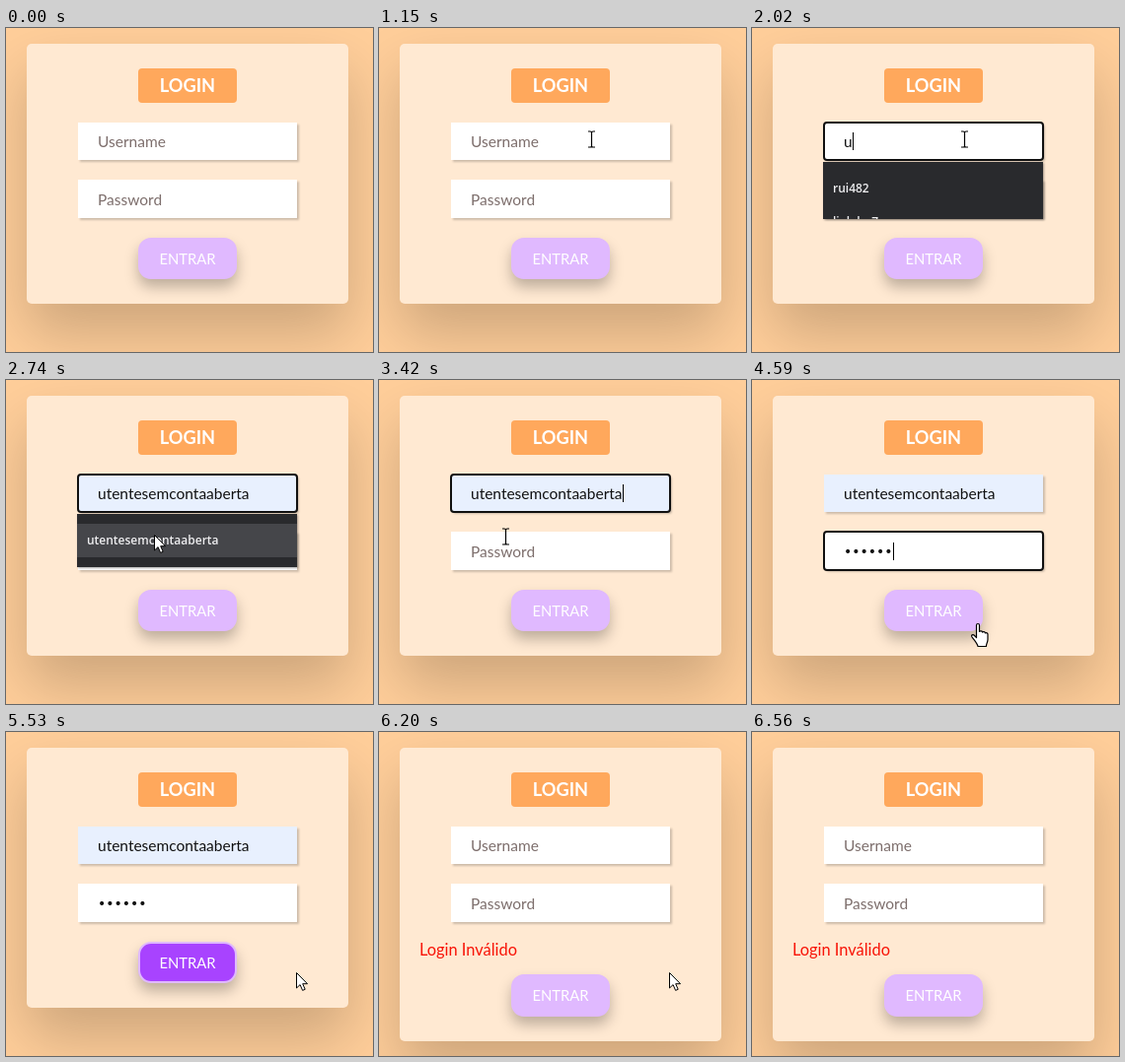
Write an HTML page that moves like this. It is 372 by 329 pixels and loops after 6.99 s.

```html
<!DOCTYPE html>
<html lang="pt">
<head>
<meta charset="utf-8">
<title>Login</title>
<style>
  html, body { margin: 0; width: 100%; height: 100%; overflow: hidden; }
  body { background: #ffce9a; }
  #stage {
    position: relative; width: 372px; height: 329px; overflow: hidden;
    font: 15.5px Lato, sans-serif; cursor: none;
  }
  #stage > * { position: absolute; box-sizing: border-box; }
  .card {
    left: 21px; top: 16px; width: 326px; height: 264px;
    border-radius: 5px; background: #ffe9d2;
    box-shadow: 0 30px 60px rgba(0, 0, 0, .2);
  }
  .title, .button { left: 134px; width: 100px; color: #fff; text-align: center; }
  .title {
    top: 41px; height: 35px; border-radius: 4px; background: #ffa85c;
    font-size: 18.2px; font-weight: 700; line-height: 35px;
  }
  .field {
    left: 73px; width: 222px; padding-left: 20px;
    display: flex; align-items: center; white-space: pre;
    background: #fff; color: #111; box-shadow: 2px 2px 2px rgba(0, 0, 0, .2);
  }
  .user { top: 96px; height: 38px; }
  .pass { top: 154px; height: 39px; }
  .field.focus { outline: 2px solid #101010; outline-offset: -1px; border-radius: 3px; }
  .field.filled { background: #e8f0fe; }
  .hint { color: #7d6e6c; }
  .pass .value { font: 14px "DejaVu Sans", sans-serif; }
  .caret { width: 1px; height: 18px; margin-right: -1px; background: #000; }
  .button {
    top: 213px; height: 42px; border: 2px solid #e0b9ff; border-radius: 13px;
    background: #e0b9ff; font-size: 14.8px; line-height: 38px;
    box-shadow: 0 8px 14px rgba(0, 0, 0, .26);
  }
  .error { left: 41px; top: 211px; font-size: 16.4px; line-height: 20px; color: #f81408; }
  .list {
    left: 72px; top: 136px; width: 223px; padding-top: 10px; overflow: hidden;
    background: #292a2d; color: #eeeef0; box-shadow: 1px 1px 2px rgba(0, 0, 0, .35);
    font: 600 12px/34px "Open Sans", sans-serif;
  }
  .list div { padding-left: 10px; height: 34px; }
  .list .on { background: #45464a; }
  .failed .card { height: 298px; }
  .failed .button { top: 246px; height: 43px; }
  #stage > .cursor { left: 0; top: 0; overflow: visible; }
</style>
</head>
<body>
<div id="stage">
  <div class="card"></div>
  <div class="title">LOGIN</div>
  <div class="field user"><i class="caret"></i><span class="hint">Username</span></div>
  <div class="field pass"><i class="caret"></i><span class="hint">Password</span></div>
  <div class="error">Login Inválido</div>
  <div class="button">ENTRAR</div>
  <div class="list"></div>
  <svg class="cursor" width="1" height="1" fill="#fff" stroke="#000" stroke-linejoin="round">
    <path id="arrow" d="M.5 .5V16l3.6-3.4 2.5 5.8 2.6-1.1-2.5-5.6h4.8Z"/>
    <path id="beam" fill="none" stroke-width="1.2"
      d="M-3-8h2q1.5 0 1.5 1.5Q.5-8 2-8H4M.5-7V7M-3 8h2Q.5 8 .5 6.500Q.5 8 2 8H4"/>
    <path id="hand" stroke-width="1.2"
      d="M-1.500 2C-1.500 0 1.500 0 1.500 2V8.500c.6-1.100 3-.9 3 .6 .8-.9 2.800-.5 2.900.9 .9-.7 2.600-.1 2.600 1.300V16.500c0 3-1.600 4-1.600 7H0C-.5 20.500-3.500 17.500-6 14-7.300 12-5 10.800-3.500 12.500L-1.500 14.700Z"/>
  </svg>
</div>
<script>
const LOOP = 6990;
const NAME = 'utentesemcontaaberta';
const SAVED = ['rui482', 'lialobo7', NAME, 'caio.nunes', 'teo35', 'dalva_m'];

const OPEN = 1220, TYPE = 2020, FILTER = 2060, PREVIEW = 2640, PICK = 2990;
const TO_PASS = 3550, DOTS = 3790, DOT_GAP = 86, CLICK = 5020, FAIL = 5600;

// time, x, y of the pointer's hot spot
const PATH = [
  [420, 374, 152], [600, 215, 113], [2560, 215, 113], [2740, 150, 157],
  [3220, 150, 157], [3420, 128, 159], [3550, 126, 160], [4220, 126, 160],
  [4390, 306, 253], [4450, 284, 255], [4590, 229, 247], [5260, 229, 247],
  [5520, 294, 244], [6200, 294, 244], [6560, 347, 331]
];

const stage = document.getElementById('stage');
const $ = s => stage.querySelector(s);
const within = (t, a, b) => t >= a && t < b;
const clamp = v => Math.min(1, Math.max(0, v));
const ease = k => k * k * (3 - 2 * k);
const inBox = ([x, y], l, t, r, b) => x >= l && x < r && y >= t && y < b;

function field(cls) {
  const box = $(cls), caret = box.querySelector('.caret'), hint = box.querySelector('.hint');
  const value = document.createElement('span');
  value.className = 'value';
  box.prepend(value);
  return (text, focus, blink, filled) => {
    value.textContent = text;
    hint.hidden = text !== '';
    caret.style.visibility = blink ? 'visible' : 'hidden';
    box.classList.toggle('focus', focus);
    box.classList.toggle('filled', filled);
  };
}

const user = field('.user'), pass = field('.pass');
const list = $('.list'), button = $('.button'), error = $('.error'), cursor = $('.cursor');
const rows = SAVED.map(name => {
  const row = document.createElement('div');
  row.textContent = name;
  list.append(row);
  return row;
});

function pointer(t) {
  const i = PATH.findIndex(p => p[0] > t);
  if (i < 1) return null;
  const [t0, x0, y0] = PATH[i - 1], [t1, x1, y1] = PATH[i];
  const k = ease((t - t0) / (t1 - t0));
  return [x0 + (x1 - x0) * k, y0 + (y1 - y0) * k];
}

function shape(p, listOpen) {
  if (listOpen && inBox(p, 72, 136, 295, 329)) return 'arrow';
  if (inBox(p, 73, 96, 295, 134) || inBox(p, 73, 154, 295, 193)) return 'beam';
  return inBox(p, 134, 213, 234, 255) ? 'hand' : 'arrow';
}

function drawList(t, open) {
  list.style.display = open ? 'block' : 'none';
  list.style.height = (t < TYPE ? 214 : t < 2120 ? 58 : 54) + 'px';
  rows.forEach((row, i) => {
    row.hidden = t >= FILTER && SAVED[i] !== NAME;
    row.classList.toggle('on', t >= PREVIEW && SAVED[i] === NAME);
  });
}

function draw(t) {
  const failed = t >= FAIL || t < OPEN;
  const invalid = t >= FAIL;
  const open = within(t, OPEN, PICK);

  const name = failed || t < TYPE ? '' : t < PREVIEW ? 'u' : NAME;
  const caret = within(t, OPEN, 1660) || within(t, TYPE, 2560) || within(t, PICK, TO_PASS);
  user(name, within(t, OPEN, TO_PASS), caret, name === NAME);

  const dots = failed ? 0 : Math.min(6, Math.max(0, Math.ceil((t - DOTS) / DOT_GAP)));
  pass('•'.repeat(dots), within(t, TO_PASS, CLICK), within(t, TO_PASS, 4720), false);

  drawList(t, open);

  const hot = invalid ? 0 : clamp((t - 4600) / 120);
  const mix = (a, b) => Math.round(a + (b - a) * hot);
  button.style.backgroundColor = `rgb(${mix(224, 168)}, ${mix(185, 67)}, 255)`;
  stage.classList.toggle('failed', invalid);
  error.hidden = !invalid;

  const p = pointer(t);
  cursor.style.display = p ? 'block' : 'none';
  if (p) {
    cursor.style.transform = `translate(${Math.round(p[0])}px, ${Math.round(p[1])}px)`;
    const kind = shape(p, open);
    for (const path of cursor.children) path.style.display = path.id === kind ? '' : 'none';
  }
}

const start = performance.now();
function tick() {
  draw((performance.now() - start) % LOOP);
  requestAnimationFrame(tick);
}
tick();
</script>
</body>
</html>
```
